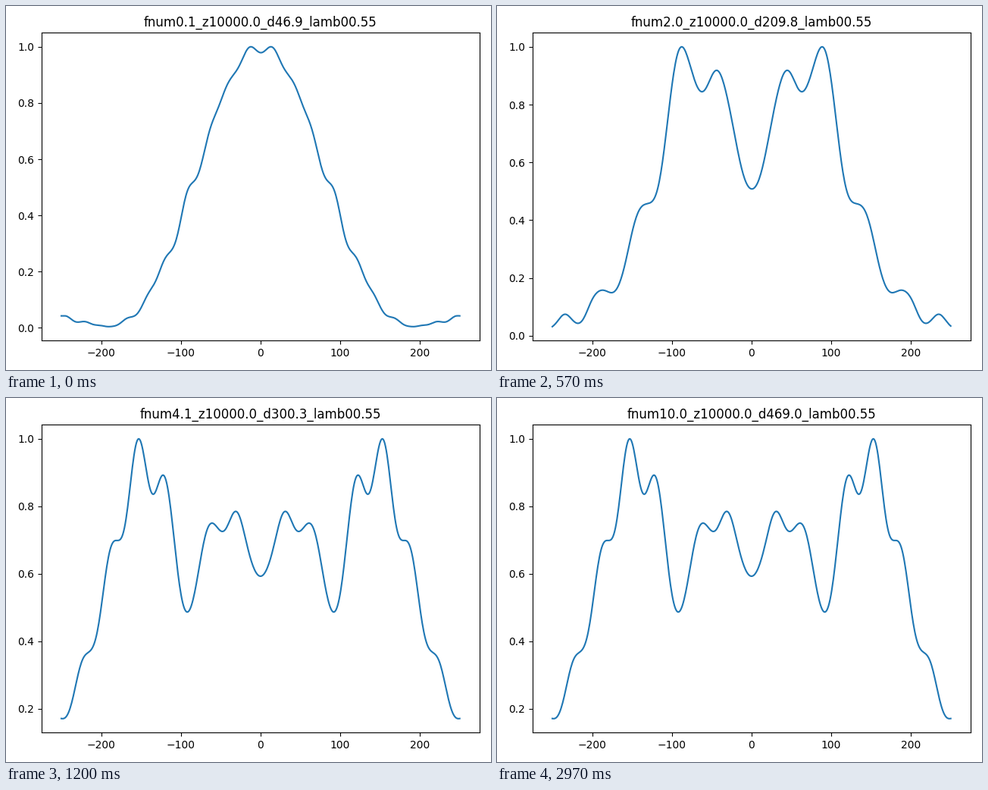
A matplotlib script for the animation above (3 s loop, 640x480 px).

```python
import numpy as np
import matplotlib.pyplot as plt
from matplotlib.animation import FuncAnimation

FRAMES, INTERVAL = 100, 30
N, PITCH = 500, 0.6              # samples and their spacing in um
Z, LAM = 10000.0, 0.55           # distance and wavelength in um

# Band-limited angular spectrum on a window padded to twice the width;
# only frequencies inside the pass band are kept.
step = 1 / (2 * N * PITCH)
f_max = 1 / (LAM * np.hypot(2 * step * Z, 1))
k_max = int(f_max / step)
freq = step * np.arange(-k_max, k_max + 1)
f_sq = freq[:, None]**2 + freq**2
phase = 2 * np.pi * Z * (np.sqrt(1 / LAM**2 - f_sq) - 1 / LAM)
transfer = np.exp(1j * phase) * (f_sq < f_max**2)

pos = PITCH * np.arange(-N // 2, N // 2)
waves = np.exp(2j * np.pi * np.outer(pos, freq))


def side(fnum):
    return 2 * np.sqrt(fnum * Z * LAM)


def profile(width):
    """Normalised intensity on the centre row behind a square opening."""
    opening = np.abs(pos) <= width / 2
    spectrum = opening @ waves.conj()
    field = waves @ (spectrum * (transfer @ spectrum))
    power = np.abs(field)**2
    return power / power.max()


fig, ax = plt.subplots(figsize=(6.4, 4.8), dpi=100)
line, = ax.plot(np.linspace(-250, 250, N), profile(side(0.1)),
                color="#1f77b4", lw=1.5)
title = ax.set_title("")


def update(i):
    fnum = (i + 1) / 10
    width = side(fnum)
    y = profile(width)
    line.set_ydata(y)
    pad = 0.05 * np.ptp(y)
    ax.set_ylim(y.min() - pad, y.max() + pad)
    title.set_text(f"fnum{fnum:.1f}_z{Z}_d{width:.1f}_lamb0{LAM}")
    return line, title


update(0)
fig.tight_layout()
fig.subplots_adjust(top=1 - 35.33 / 480)
anim = FuncAnimation(fig, update, frames=FRAMES, interval=INTERVAL,
                     repeat=True, repeat_delay=0, blit=False)
plt.show()
```
